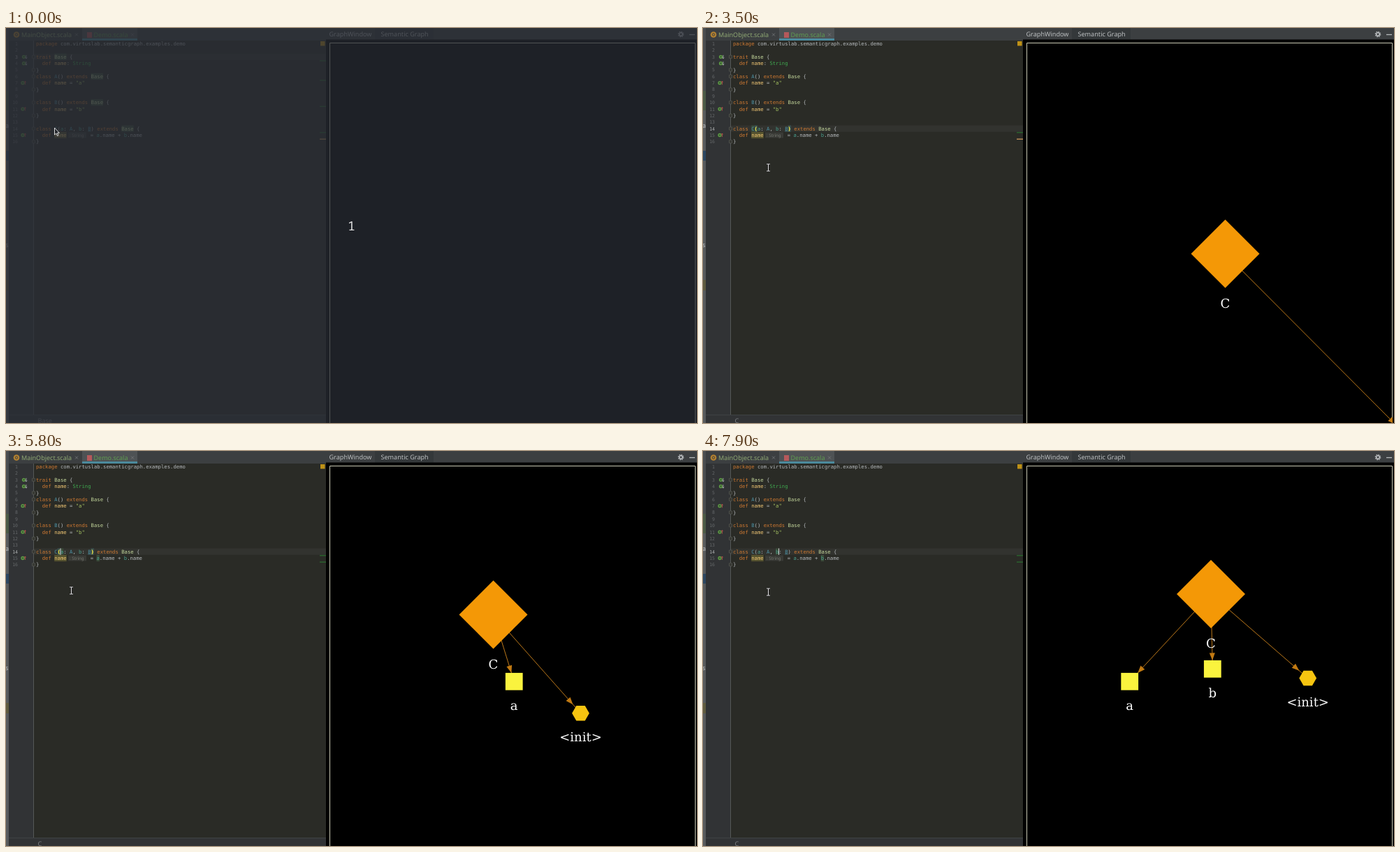
Animation of 989x566 px, one loop 8000 ms. Source, as an HTML page:

```html
<!DOCTYPE html>
<html lang="en">
<head>
<meta charset="utf-8">
<title>Semantic graph demo</title>
<style>
html, body { margin: 0; width: 100%; height: 100%; overflow: hidden; background: #000; }
svg { display: block; }
text { white-space: pre; text-rendering: geometricPrecision; }
.code { font: 7.25px "DejaVu Sans Mono", monospace; fill: #b4b8bb; }
.num { font: 6.5px "DejaVu Sans Mono", monospace; text-anchor: end; }
.ui { font: 9.1px "Noto Sans", "Open Sans", sans-serif; fill: #bcbfc1; }
.tab { font-size: 9px; }
.label { font: 18px "DejaVu Serif", serif; fill: #fff; text-anchor: middle; }
</style>
</head>
<body>
<svg width="100%" height="100%" viewBox="0 0 989 566">
  <rect width="989" height="566" fill="#3c3f41"/>
  <!-- editor -->
  <rect x="4" y="18" width="454" height="537" fill="#2a2b26"/>
  <rect x="4" y="18" width="35" height="537" fill="#313335"/>
  <rect x="4" y="554" width="454" height="12" fill="#313335"/>
  <path d="M4 554.5H458" stroke="#3f4244"/>
  <rect width="4" height="566" fill="#575a5c"/>
  <rect width="4" height="90" fill="#4a4d4f"/>
  <rect y="90" width="4" height="28" fill="#4b5a45"/>
  <rect y="176" width="4" height="14" fill="#2c4761"/>
  <rect y="361" width="4" height="15" fill="#5f5b3f"/>
  <text class="ui" x="-1" y="143">a</text>
  <text class="ui" x="-1" y="314">s</text>
  <g id="back"></g>
  <path d="M39.5 18V554" stroke="#555856"/>
  <g id="code"></g>
  <!-- tabs -->
  <rect x="109" width="79" height="18" fill="#4e5254"/>
  <rect x="109" y="15" width="79" height="3" fill="#4b8a9c"/>
  <circle cx="15" cy="9.5" r="4.3" fill="#b5822f"/>
  <circle cx="15" cy="9.5" r="1.7" fill="none" stroke="#3c3f41"/>
  <rect x="116" y="6" width="7" height="8" fill="#b5595b"/>
  <text class="ui tab" x="22" y="13" style="fill:#8fa873">MainObject.scala</text>
  <text class="ui tab" x="125.5" y="13" style="fill:#5f9d50">Demo.scala</text>
  <path d="M99 7.5l4 4m0-4l-4 4M179 7.5l4 4m0-4l-4 4" stroke="#76797b" stroke-width=".8"/>
  <rect x="450" y="19" width="6.5" height="6.5" fill="#be9117"/>
  <!-- tool window -->
  <rect x="528" width="84" height="17" fill="#34383a"/>
  <text class="ui" x="462.5" y="12.3">GraphWindow</text>
  <text class="ui" x="536.5" y="12.3">Semantic Graph</text>
  <g fill="none" stroke="#b5b8ba">
    <circle cx="966" cy="9" r="2.3" stroke-width="1.7"/>
    <circle cx="966" cy="9" r="3.7" stroke-width="1.3" stroke-dasharray="1.5 1.4"/>
    <path d="M978 9.5h8" stroke-width="1.3"/>
  </g>
  <rect x="458" y="16.5" width="531" height="550" fill="#000"/>
  <path d="M463.5 566V21.500H986.5V566" fill="none" stroke="#c9c9b4"/>
  <svg id="graph" x="464" y="22" width="523" height="544" viewBox="464 22 523 544"></svg>
  <g id="front"></g>
</svg>
<script>
const $ = id => document.getElementById(id);
const CHAR = 4.365, LINE = 9.35;
// The type hint on row 15 is slightly narrower than the blanks that stand for it.
const colX = (col, row) => 43 + col * CHAR - (row === 15 && col > 17 ? .8 : 0);
const rowY = row => 22.6 + (row - 1) * LINE;
const rect = (x, y, w, h, fill) => `<rect x="${x}" y="${y}" width="${w}" height="${h}" fill="${fill}"/>`;
const text = (cls, x, y, body, style = '') => `<text class="${cls}" x="${x}" y="${y}" style="${style}">${body}</text>`;
const cell = (row, col, len, fill) => rect(colX(col, row), rowY(row) - LINE / 2, len * CHAR, LINE, fill);

const source = `package com.virtuslab.semanticgraph.examples.demo

trait Base {
  def name: String
}
class A() extends Base {
  def name = "a"
}

class B() extends Base {
  def name = "b"
}

class C(a: A, b: B) extends Base {
  def name        = a.name + b.name
}`.split('\n');

function paint(line, row) {
  let prev = '';
  return line.replace(/"\w"|\w+|[^\w\s]+/g, (word, col) => {
    const color = /^(package|trait|class|def|extends)$/.test(word) ? '#cc7832'
      : prev === 'def' ? '#f0c674'
      : word === 'Base' ? '#c3d69b'
      : word === 'String' ? '#3fa64f'
      : /^"/.test(word) ? '#a5c261'
      : /^[ABC]$/.test(word) ? '#4d94a8'
      : /^[ab]$/.test(word) ? '#4aa08f' : '#b4b8bb';
    prev = word;
    return `<tspan x="${colX(col, row)}" fill="${color}">${word}</tspan>`;
  });
}

function gutterIcon(row, down) {
  const y = rowY(row), x = down ? 25.5 : 24, s = down ? 1 : -1;
  return `<circle cx="${x}" cy="${y}" r="2" fill="#3c5a35" stroke="#5f9f45" stroke-width="1.3"/>`
    + `<path d="M${x + 3.4} ${y - 2.5 * s}v${5 * s}m-1.2 ${-1.5 * s}l1.2 ${1.5 * s}l1.2 ${-1.5 * s}" fill="none" stroke="${down ? '#b8bcbe' : '#c75450'}" stroke-width=".8"/>`;
}

function codeLayer() {
  const y = rowY(15);
  let out = rect(89, y - 4, 26, 8, '#393a36')
    + text('ui', 91, y + 2.2, ': String', 'font-size:6.2px;fill:#74776f')
    + rect(colX(17), rowY(14) + 3.4, CHAR, .7, '#4d94a8');
  source.forEach((line, i) => {
    const row = i + 1;
    out += text('code', 43, rowY(row) + 2.5, paint(line, row));
    if (/^(trait|class|})/.test(line))
      out += `<path d="M37.5 ${rowY(row) - 2}h4v4h-4zm1 2h2" fill="#2a2b26" stroke="#5c5f5a" stroke-width=".7"/>`;
    if (/^(trait|  def)/.test(line)) out += gutterIcon(row, /trait|:/.test(line));
  });
  return out;
}

// Nodes travel between shared beats; each beat ends its own kind of easing.
const beats = [
  { end: 3500, ease: u => u },
  { end: 5200, ease: u => 1 - (1 - u) ** 2 },
  { end: 6500, ease: u => u },
  { end: 7900, ease: u => u ** 3 }
];
const nodes = [
  { name: 'C', shape: 'diamond', color: '#f49806', born: 1000,
    stops: [[744.2, 323.6], [747.5, 323.5], [687.4, 252], [709.3, 214], [727, 205]] },
  { name: '&lt;init&gt;', shape: 'hexagon', color: '#f6c410', born: 2900,
    stops: [[1022, 600], [1003, 580], [828.3, 398.5], [815.7, 349], [865.7, 325.5]] },
  { name: 'a', shape: 'square', color: '#faf33e', born: 4600,
    stops: [[756, 352], [747.3, 340], [703.8, 319], [610.7, 330.3]] },
  { name: 'b', shape: 'square', color: '#faf33e', born: 7500,
    stops: [[722, 302], [729.3, 312.3]] }
];

function place({ born, stops }, t) {
  let start = Math.max(born, 2800), from = stops[0];
  const route = beats.slice(1 - stops.length);
  for (let i = 0; i < route.length; i++) {
    const { end, ease } = route[i], to = stops[i + 1];
    if (t < end) {
      const f = ease(Math.max(0, (t - start) / (end - start)));
      return from.map((v, k) => v + (to[k] - v) * f);
    }
    [start, from] = [end, to];
  }
  return from;
}

function polygon(kind, x, y, r, fill) {
  const [count, turn, size] = { diamond: [4, 0, r], square: [4, 45, r * Math.SQRT2], hexagon: [6, 0, r] }[kind];
  const points = Array.from({ length: count }, (_, i) => {
    const a = (turn + i * 360 / count) * Math.PI / 180;
    return [x + size * Math.cos(a), y + size * Math.sin(a)];
  });
  return `<polygon points="${points.join(' ')}" fill="${fill}"/>`;
}

function arrow([x0, y0], [x, y], r) {
  const dx = x - x0, dy = y - y0;
  const gap = r * Math.hypot(dx, dy) / Math.max(Math.abs(dx), Math.abs(dy));
  const angle = Math.atan2(dy, dx) * 180 / Math.PI;
  return `<path d="M${x0} ${y0}L${x} ${y}" stroke="#bc781a"/>`
    + `<path d="M${-gap} 0l-10.5-4v8z" fill="#c27a12" transform="translate(${x} ${y}) rotate(${angle})"/>`;
}

function graphLayer(t) {
  const root = place(nodes[0], t);
  let edges = '', bodies = '', labels = '';
  for (const n of nodes.filter(n => n.born <= t)) {
    const [x, y] = place(n, t), isRoot = n === nodes[0];
    const r = !isRoot ? 12.4 : t < 2900 ? 30.5 : 49;
    if (!isRoot) edges += arrow(root, [x, y], r);
    bodies += polygon(n.shape, x, y, r, n.color);
    labels += text('label', x, y + r + 28.4, n.name);
  }
  return edges + bodies + labels;
}

// Slow single steps first, then a quick run to the second parameter.
const caretCol = t => t < 6400 ? Math.max(6, 6 + Math.floor((t - 1000) / 1800))
  : Math.min(15, 9 + Math.floor((t - 6400) / 200));
const caretShown = t => t >= 4600 || (t - (t < 2800 ? 1600 : 2800)) % 1000 < 500;

// All places of a name in the code, as { row, col }.
function usages(name) {
  if (!name) return [];
  const pattern = new RegExp(`(?<!")\\b${name}\\b`, 'g');
  return source.flatMap((line, i) => [...line.matchAll(pattern)].map(m => ({ row: i + 1, col: m.index })));
}

function pointer(t) {
  if (t < 100)
    return '<path d="M69.5 143v10l2.3-2l1.7 3.5l1.5-.8l-1.6-3.3h3z" fill="#22252a" stroke="#eee" stroke-width=".9"/>';
  const u = Math.min(1, Math.max(0, (t - 900) / 600)), f = 1 - (1 - u) ** 2;
  const d = `M${69 + 24.5 * f - 2.5} ${143 + 57 * f + (t < 7400 ? 0 : 2) - 5}h5m-2.5 0v10m-2.5 0h5`;
  return `<path d="${d}" fill="none" stroke="#111" stroke-width="2.4"/><path d="${d}" fill="none" stroke="#e6e6e6" stroke-width="1.1"/>`;
}

function draw(t) {
  const picked = t >= 900, row = picked ? 14 : 3, col = caretCol(t), line = source[13];
  const name = picked ? [line[col], line[col - 1]].find(c => /\w/.test(c)) : 'Base';
  const found = usages(name);
  const parens = picked && (col === 7 || col === 8) ? [line.indexOf('('), line.indexOf(')')] : [];

  $('back').innerHTML = rect(40, rowY(row) - LINE / 2, 418, LINE, '#32332f')
    + cell(15, 6, 4, '#56532f')
    + found.map(f => cell(f.row, f.col, name.length, '#3a4b39')).join('')
    + parens.map(c => cell(14, c, 1, '#3b514d')).join('');

  let front = source.map((_, i) => text('num', 17, rowY(i + 1) + 2.4, i + 1, 'fill:' + (i + 1 === row ? '#b0b2b3' : '#65686a'))).join('');
  front += text('ui', 45.5, 566, picked ? 'C' : 'Base', 'fill:#7b7e80');
  const marks = new Set(found.map(f => f.row));
  if (picked) marks.add(14);
  for (const r of marks) front += rect(449, rowY(r) + 5, 9, 1.3, '#2a6a2e');
  if (!marks.has(15)) front += rect(449, rowY(15) + 5, 9, 1.5, '#b88a55');
  front += parens.map(c => text('code', colX(c), rowY(14) + 2.5, line[c], 'font-weight:bold;fill:#ffef28')).join('');
  if (picked && caretShown(t)) front += rect(colX(col) - .4, rowY(14) - LINE / 2, 1, LINE, '#d8d8d8');
  if (t < 100)
    front += '<rect width="989" height="566" fill="#282c34" opacity=".75"/>'
      + text('key', 489, 290, 1, "font:18px 'Noto Sans Mono',monospace;fill:#e4e4e4");
  $('front').innerHTML = front + pointer(t);
  $('graph').innerHTML = graphLayer(t);
}

$('code').innerHTML = codeLayer();
let shown = -1;
function tick() {
  const step = Math.floor(performance.now() % 8000 / 100) * 100;
  if (step !== shown) draw(shown = step);
  requestAnimationFrame(tick);
}
tick();
</script>
</body>
</html>
```
